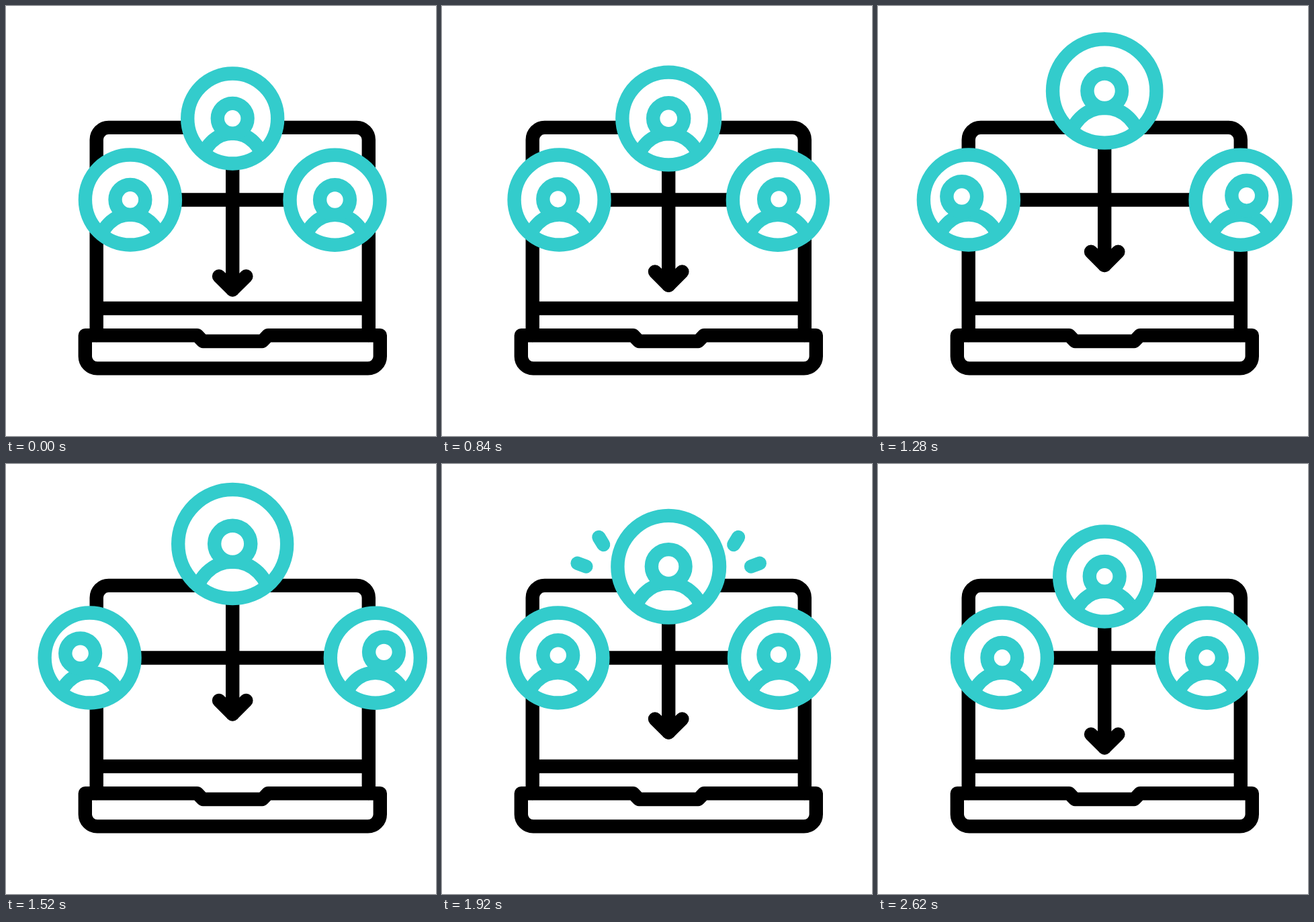
Recreate the animation shown at these times as an HTML page with a canvas. Size 640 px wide and 640 px high, loop 3 s.

```html
<!DOCTYPE html>
<html lang="en">
<head>
<meta charset="utf-8">
<title>Team connecting to a laptop</title>
<style>
html, body { margin: 0; height: 100%; overflow: hidden; background: #fff; }
canvas { display: block; width: 100vmin; height: 100vmin; }
</style>
</head>
<body>
<canvas id="stage" width="640" height="640"></canvas>
<script>
const ctx = document.getElementById('stage').getContext('2d');
const LOOP = 3000, TEAL = '#33cccc', MID = 337.2, ROW = 288.5;

// Monotone cubic track through [time, value] keys; flat at both ends and at turning points.
function track(...keys) {
  const slope = i => (keys[i + 1][1] - keys[i][1]) / (keys[i + 1][0] - keys[i][0]);
  const tangents = keys.map((key, i) => {
    if (i === 0 || i === keys.length - 1) return 0;
    const a = slope(i - 1), b = slope(i);
    return a * b > 0 ? 2 * a * b / (a + b) : 0;
  });
  return t => {
    if (t <= keys[0][0]) return keys[0][1];
    const n = keys.findIndex(key => key[0] > t);
    if (n < 0) return keys[keys.length - 1][1];
    const [t0, v0] = keys[n - 1], [t1, v1] = keys[n];
    const d = t1 - t0, x = (t - t0) / d, ease = x * x * (3 - 2 * x);
    return v0 + (v1 - v0) * ease
      + d * x * (1 - x) * (tangents[n - 1] * (1 - x) - tangents[n] * x);
  };
}

const spread = track([600, 0], [840, 10.3], [1280, 50], [1520, 60.3], [1700, 64.8], [2095, -24], [2610, 0]);
const topY = track([840, 167.5], [1280, 126.5], [1520, 119], [1700, 116.3], [2095, 178.1], [2610, 167.5]);
const topScale = track([600, 1], [1700, 1.225], [2200, 1]);
const arrowLift = track([600, 0], [1700, -54], [2100, 0]);
const leftHeadX = track([600, 0], [1700, -15], [2120, 13.5], [2610, 0]);
const rightHeadX = track([600, 0], [1700, 13.6], [2120, -13.7], [2610, 0]);
const leftHeadY = track([600, 0], [1700, -7], [2150, 0]);
const rightHeadY = track([600, 0], [1700, -9.3], [2150, 0]);
const rayFront = track([1800, 0], [2200, 1]);
const rayBack = track([2000, 0], [2400, 1]);

function line(...points) {
  ctx.beginPath();
  points.forEach(([x, y]) => ctx.lineTo(x, y));
  ctx.stroke();
}

function circle(x, y, r) {
  ctx.beginPath();
  ctx.arc(x, y, r, 0, 2 * Math.PI);
}

function laptop() {
  ctx.beginPath();
  ctx.moveTo(134.7, 490);
  ctx.arcTo(134.7, 180.9, 337, 180.9, 18);
  ctx.arcTo(539.8, 180.9, 539.8, 490, 18);
  ctx.lineTo(539.8, 490);
  ctx.moveTo(134.7, 450);
  ctx.lineTo(539.8, 450);
  ctx.stroke();

  ctx.beginPath();
  ctx.moveTo(117.8, 490.2);
  ctx.lineTo(284.5, 490.2);
  ctx.lineTo(293, 499);
  ctx.lineTo(381.5, 499);
  ctx.lineTo(390, 490.2);
  ctx.lineTo(556.8, 490.2);
  ctx.arcTo(556.8, 539.4, 337, 539.4, 18);
  ctx.arcTo(117.8, 539.4, 117.8, 490.2, 18);
  ctx.closePath();
  ctx.stroke();
}

function avatar(x, y, scale = 1, headX = 0, headY = 0) {
  const r = 67 * scale;
  circle(x, y, r);
  ctx.fill();
  ctx.save();
  ctx.clip();
  circle(x, y + 67 * scale, 45 * scale);
  ctx.stroke();
  ctx.restore();
  circle(x + headX, y + headY - 0.2, 22.4 * scale);
  ctx.fill();
  ctx.stroke();
  circle(x, y, r);
  ctx.stroke();
}

function ray(x0, y0, x1, y1, from, to) {
  const at = p => [x0 + (x1 - x0) * p, y0 + (y1 - y0) * p];
  line(at(from), at(to));
}

function draw(t) {
  ctx.fillStyle = '#fff';
  ctx.fillRect(0, 0, 640, 640);
  ctx.lineWidth = 20.4;
  ctx.lineCap = ctx.lineJoin = 'round';
  ctx.strokeStyle = '#000';
  laptop();

  const reach = 152.3 + spread(t), top = topY(t), tip = 422.4 + arrowLift(t);
  line([MID - reach, ROW], [MID + reach, ROW]);
  line([MID, top], [MID, tip]);
  line([MID - 20.2, tip - 20.2], [MID, tip], [MID + 20.2, tip - 20.2]);

  ctx.strokeStyle = TEAL;
  avatar(MID - reach, ROW, 1, leftHeadX(t), leftHeadY(t));
  avatar(MID + reach, ROW + 0.2, 1, rightHeadX(t), rightHeadY(t));
  avatar(MID, top, topScale(t));

  const from = rayBack(t), to = rayFront(t);
  if (to > from) {
    for (const side of [-1, 1]) {
      ray(MID + side * 97, 120, MID + side * 128, 69.5, from, to);
      ray(MID + side * 122.8, 152.5, MID + side * 181.2, 131, from, to);
    }
  }
}

const start = performance.now();
function frame() {
  draw((performance.now() - start) % LOOP);
  requestAnimationFrame(frame);
}
frame();
</script>
</body>
</html>
```
